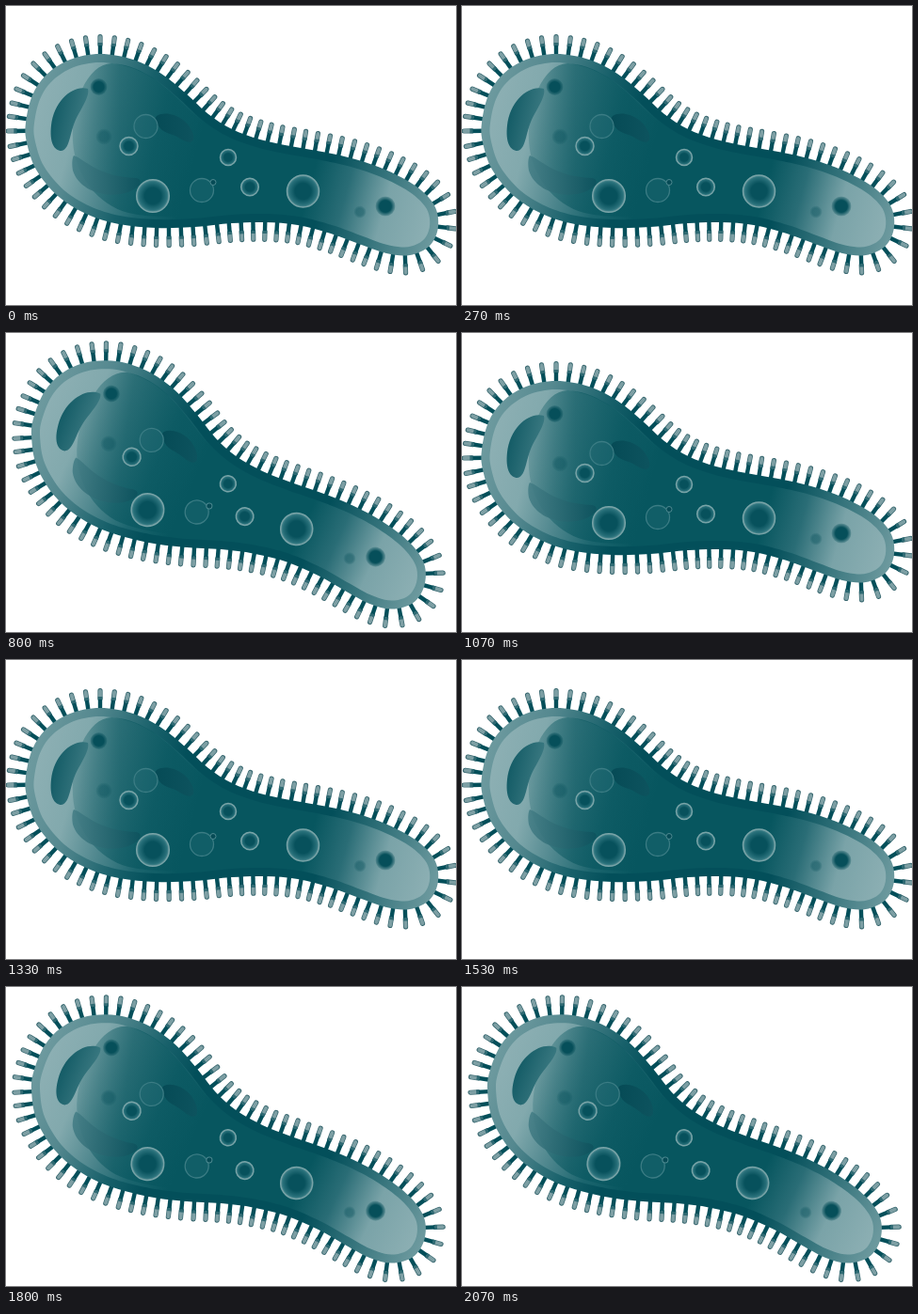
An HTML page for the animation above (2140 ms loop, 478 by 318 pixels).

```html
<!DOCTYPE html>
<html lang="en">
<head>
<meta charset="utf-8">
<title>Wriggling bacterium</title>
<style>
html, body { margin: 0; width: 100%; height: 100%; overflow: hidden; background: #fff; }
svg { display: block; width: 478px; height: 318px; }
</style>
</head>
<body>
<svg viewBox="0 0 478 318">
  <defs>
    <linearGradient id="wall" gradientUnits="userSpaceOnUse" x1="24" y1="120" x2="456" y2="238">
      <stop offset="0" stop-color="#6c999e"/>
      <stop offset=".12" stop-color="#54888f"/>
      <stop offset=".26" stop-color="#17606a"/>
      <stop offset=".35" stop-color="#034f5a"/>
      <stop offset=".72" stop-color="#034f5a"/>
      <stop offset=".86" stop-color="#37757d"/>
      <stop offset="1" stop-color="#6c999e"/>
    </linearGradient>
    <linearGradient id="plasm" gradientUnits="userSpaceOnUse" x1="30" y1="122" x2="450" y2="237">
      <stop offset="0" stop-color="#8cafb3"/>
      <stop offset=".1" stop-color="#82a9ad"/>
      <stop offset=".2" stop-color="#4f878e"/>
      <stop offset=".3" stop-color="#1b656e"/>
      <stop offset=".4" stop-color="#07565f"/>
      <stop offset=".69" stop-color="#07565f"/>
      <stop offset=".78" stop-color="#2a6d76"/>
      <stop offset=".88" stop-color="#7aa3a8"/>
      <stop offset="1" stop-color="#8cafb3"/>
    </linearGradient>
    <linearGradient id="core">
      <stop offset="0" stop-color="#07565f" stop-opacity=".22"/>
      <stop offset=".25" stop-color="#07565f" stop-opacity=".6"/>
      <stop offset=".55" stop-color="#07565f" stop-opacity=".7"/>
      <stop offset="1" stop-color="#07565f" stop-opacity="0"/>
    </linearGradient>
    <linearGradient id="bean" x1="0" y1="0" x2="1" y2=".35">
      <stop offset="0" stop-color="#0b5560"/>
      <stop offset="1" stop-color="#3c7a82"/>
    </linearGradient>
    <linearGradient id="lobe">
      <stop offset="0" stop-color="#457e86"/>
      <stop offset="1" stop-color="#0d525d"/>
    </linearGradient>
    <linearGradient id="fold">
      <stop offset="0" stop-color="#064b56"/>
      <stop offset="1" stop-color="#0d535e"/>
    </linearGradient>
    <radialGradient id="bubble">
      <stop offset=".5" stop-color="#07515c"/>
      <stop offset=".85" stop-color="#28707a"/>
      <stop offset="1" stop-color="#558e94"/>
    </radialGradient>
    <radialGradient id="spot">
      <stop offset=".6" stop-color="#064f5a"/>
      <stop offset="1" stop-color="#064f5a" stop-opacity=".2"/>
    </radialGradient>
  </defs>
  <g id="cell"></g>
</svg>
<script>
const LOOP = 2140, TURNS = [530, 1070, 1600];
const cell = document.getElementById('cell');

function add(tag, attrs) {
  const node = document.createElementNS('http://www.w3.org/2000/svg', tag);
  for (const key in attrs) node.setAttribute(key, attrs[key]);
  return cell.appendChild(node);
}

const knots = [
  [100, 51], [135, 57], [165, 72], [191, 93], [215, 115], [240, 131], [270, 142],
  [302, 149], [336, 155], [371, 163], [405, 175], [436, 192], [455, 212], [459, 235],
  [450, 255], [429, 265], [404, 263], [375, 253], [345, 242], [310, 233], [275, 230],
  [240, 231], [200, 235], [160, 236], [120, 232], [85, 221], [55, 202], [32, 174],
  [22, 145], [21, 124], [28, 95], [43, 73], [68, 57]
];

// Closed Catmull-Rom spline through the knots.
function splinePath(points) {
  const n = points.length, at = i => points[(i + n) % n];
  const handle = (p, a, b) => [p[0] + (b[0] - a[0]) / 6, p[1] + (b[1] - a[1]) / 6];
  return 'M' + at(0) + points.map((p, i) => 'C' + [
    handle(p, at(i - 1), at(i + 1)), handle(at(i + 1), at(i + 2), p), at(i + 1)
  ].join(' ')).join('') + 'Z';
}

const wall = add('path', { d: splinePath(knots), fill: 'url(#wall)' });
const girth = wall.getTotalLength();

function edge(s) {
  const p = wall.getPointAtLength(s);
  const a = wall.getPointAtLength((s - 4 + girth) % girth);
  const b = wall.getPointAtLength((s + 4) % girth);
  const len = Math.hypot(b.x - a.x, b.y - a.y);
  const nx = (b.y - a.y) / len, ny = (a.x - b.x) / len;
  return d => [(p.x + nx * d).toFixed(2), (p.y + ny * d).toFixed(2)];
}

function inset(depth) {
  const points = [];
  for (let i = 0; i < 240; i++) points.push(edge(girth * i / 240)(-depth));
  return 'M' + points.join('L') + 'Z';
}

const CILIA = 83;
for (let i = 0; i < CILIA; i++) {
  const out = edge(girth * i / CILIA);
  const line = (from, to, stroke, width, cap = 'butt') =>
    add('path', { d: `M${out(from)}L${out(to)}`, stroke, 'stroke-width': width, 'stroke-linecap': cap });
  line(10, 18.3, '#36666e', 5.2, 'round');
  line(-2, 12, '#044f5a', 4.4);
  line(11, 18, '#7d9fa4', 3.8, 'round');
  line(9, 12, '#2f6a73', 4.2);
}
cell.append(wall);
add('path', { d: inset(9), fill: 'url(#plasm)' });
add('path', {
  d: 'M112 61C140 62 164 80 185 101C215 131 240 150 270 160L270 216C220 221 170 229 130 220C98 212 73 180 71 144C69 104 86 62 112 61Z',
  fill: 'url(#core)'
});

// Organelles
add('path', {
  d: 'M87 88C72 83 51 100 48 127C46 145 51 154 59 154C69 152 67 132 77 115C83 104 89 94 87 88Z',
  fill: 'url(#bean)'
});
add('path', {
  d: 'M72 159C84 163 96 181 138 183C146 184 144 192 130 198C104 206 77 195 71 175C70 169 70 162 72 159Z',
  fill: 'url(#lobe)', opacity: .9
});
add('path', {
  d: 'M160 117C172 110 194 119 199 137C201 147 193 146 185 141C176 135 168 136 163 129C159 124 157 120 160 117Z',
  fill: 'url(#fold)'
});

const disc = (cx, cy, r, attrs) => add('circle', { cx, cy, r, ...attrs });
const spot = (x, y, r, opacity = 1) => disc(x, y, r, { fill: 'url(#spot)', opacity });
const bubble = (x, y, r) => disc(x, y, r, { fill: 'url(#bubble)', stroke: '#78a3a7', 'stroke-width': 1.5 });
const ring = (x, y, r) => disc(x, y, r, {
  fill: '#2b7079', 'fill-opacity': .3, stroke: '#3b7c84', 'stroke-width': 1.3
});

spot(98.5, 86, 9);
spot(403, 213, 10.5);
spot(104, 139, 8.5, .4);
spot(376, 219, 6.5, .4);
ring(148.5, 128, 12.5);
ring(208, 196, 12.5);
bubble(130.5, 149, 9.5);
bubble(156, 202, 17.3);
bubble(236, 161, 8.5);
bubble(259, 192.5, 9.3);
bubble(315.5, 197, 17);
disc(220, 187.5, 3, { fill: '#064b56', stroke: '#4d8990' });

function draw(now) {
  const t = now % LOOP;
  const tilted = TURNS.filter(turn => t >= turn).length % 2;
  cell.setAttribute('transform', `rotate(${tilted ? 9.1 : 0} 240 160)`);
}

const start = performance.now();
function tick() {
  draw(performance.now() - start);
  requestAnimationFrame(tick);
}
tick();
</script>
</body>
</html>
```
